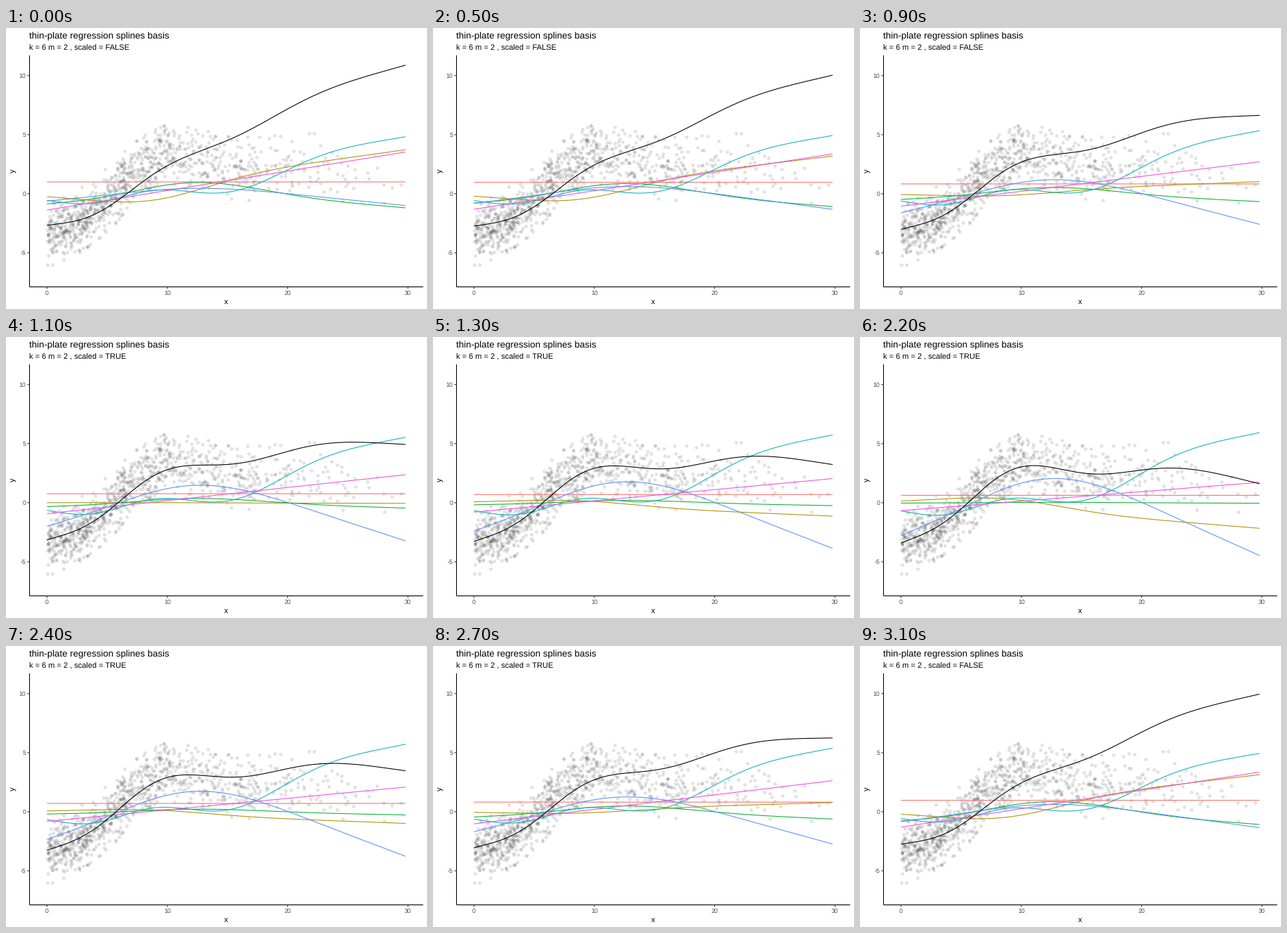
Write a matplotlib script that moves like this. It is 600x400 px and loops after 3200 ms.

```python
import numpy as np
import matplotlib.pyplot as plt
from matplotlib.animation import FuncAnimation

W, H = 600, 400
DPI = 100
PX = 72 / DPI            # points per pixel
X0, Y0 = 58.4, 235.9     # pixel position of the data origin
SX, SY = 17.15, 16.82    # pixels per data unit
LEFT, RIGHT, TOP, BOTTOM = 33.5, 594.5, 39, 368.5
FRAMES, INTERVAL = 32, 100
X_MAX = 29.8

plt.rcParams["font.family"] = "Liberation Sans"
plt.rcParams["text.hinting"] = "none"


def thin_plate(data, x, k=6):
    """Rank-k thin-plate regression spline basis (m = 2) of data, at x."""
    def kernel(a):
        return np.abs(a[:, None] - data)**3 / 12

    values, vectors = np.linalg.eigh(kernel(data))
    top = vectors[:, np.argsort(-np.abs(values))[:k]]
    null = np.array([np.ones_like(data), data])
    free = np.linalg.svd(null @ top)[2][2:].T
    wiggly = kernel(x) @ top @ free
    wiggly /= np.abs(wiggly).max(axis=0)
    return np.column_stack([wiggly, np.ones_like(x), x / X_MAX])


# key heights that pick four wiggly curves out of the spline space
KEY_X = np.array([0, 3, 6, 10, 13, 17, 21, 25, X_MAX])
KEY_Y = np.array([
    [-.25, -.50, -.71, -.32, .45, 1.65, 2.42, 3.05, 3.72],
    [-.86, -.55, -.03, .76, .92, .52, -.20, -.76, -1.19],
    [-.57, -.84, -.38, .32, .09, .63, 2.50, 3.92, 4.82],
    [-3.0, -1.57, 0, 1.80, 2.18, 1.37, -.48, -2.43, -4.82],
])

# red, olive, green, cyan, blue, pink
COLORS = ["#F8706B", "#AE9404", "#10B035", "#10B3B8", "#5A92FF", "#F250E2"]
UNSCALED = np.array([1, 1, 1, 1, 0.208, 1])
SCALED = np.array([0.59, -0.74, -0.06, 1.253, 1, 0.437])

rng = np.random.default_rng(12)
data_x = np.abs(rng.normal(0, 10.5, 1000))
data_x = data_x[data_x < X_MAX]


def curves(x):
    basis = thin_plate(data_x, np.append(KEY_X, x))
    n = len(KEY_X)
    coef = np.linalg.lstsq(basis[:n], KEY_Y.T, rcond=None)[0]
    return np.vstack([np.ones_like(x), (basis[n:] @ coef).T,
                      0.1648 * (x - 8.37)])


def to_px(x, y):
    return X0 + SX * np.asarray(x), Y0 - SY * np.asarray(y)


fig = plt.figure(figsize=(W / DPI, H / DPI), dpi=DPI, facecolor="white")
ax = fig.add_axes([0, 0, 1, 1])
ax.set_xlim(0, W)
ax.set_ylim(H, 0)
ax.axis("off")


def label(x, y, text, size, color="black", **kw):
    kw = {"ha": "left", "va": "baseline", **kw}
    return ax.text(x, y, text, fontsize=size * PX, color=color, **kw)


def stroke(xs, ys, color="black", **kw):
    return ax.plot(xs, ys, color=color, lw=1.07 * PX, snap=False,
                   solid_capstyle="butt", **kw)[0]


# noisy observations around the scaled fit
data_y = SCALED @ curves(data_x)
data_y += np.clip(rng.normal(0, 1.2, data_x.size), -2.7, 2.7)
GREY = (0, 0, 0, 0.1)
ax.scatter(*to_px(data_x, data_y), s=(3.9 * PX)**2, facecolor=GREY,
           edgecolor=GREY, linewidth=0.71 * PX)

stroke([LEFT, LEFT], [TOP, BOTTOM])
stroke([LEFT, RIGHT], [BOTTOM, BOTTOM])
for v in (-5, 0, 5, 10):
    y = to_px(0, v)[1]
    stroke([LEFT - 3, LEFT], [y, y], "#333333")
    label(28.3, y + 3.2, str(v), 8.8, "#4D4D4D", ha="right")
for v in (0, 10, 20, 30):
    x = to_px(v, 0)[0]
    stroke([x, x], [BOTTOM, BOTTOM + 3], "#333333")
    label(x, 380.3, str(v), 8.8, "#4D4D4D", ha="center")

label(33, 15, "thin-plate regression splines basis", 13.2)
caption = label(33, 31.4, "", 11)
label(313.8, 393, "x", 11, ha="center")
label(11, 203.7, "y", 11, ha="center", va="center", rotation=90)

grid = np.linspace(0, X_MAX, 300)
shapes = curves(grid)
lines = [stroke([], [], c, zorder=3) for c in COLORS]
total = stroke([], [], zorder=3)


def phase(i):
    """0 for unscaled, 1 for scaled, linear in between."""
    return np.interp(i, [4, 16, 21, 32], [0, 1, 1, 0])


def update(i):
    weights = UNSCALED + (SCALED - UNSCALED) * phase(i)
    parts = weights[:, None] * shapes
    for line, part in zip(lines, parts):
        line.set_data(*to_px(grid, part))
    total.set_data(*to_px(grid, parts.sum(axis=0)))
    scaled = "TRUE" if 11 <= i < 28 else "FALSE"
    caption.set_text(f"k = 6 m = 2 , scaled = {scaled}")
    return [*lines, total, caption]


anim = FuncAnimation(fig, update, frames=FRAMES, interval=INTERVAL,
                     repeat=True, blit=False)
plt.show()
```
